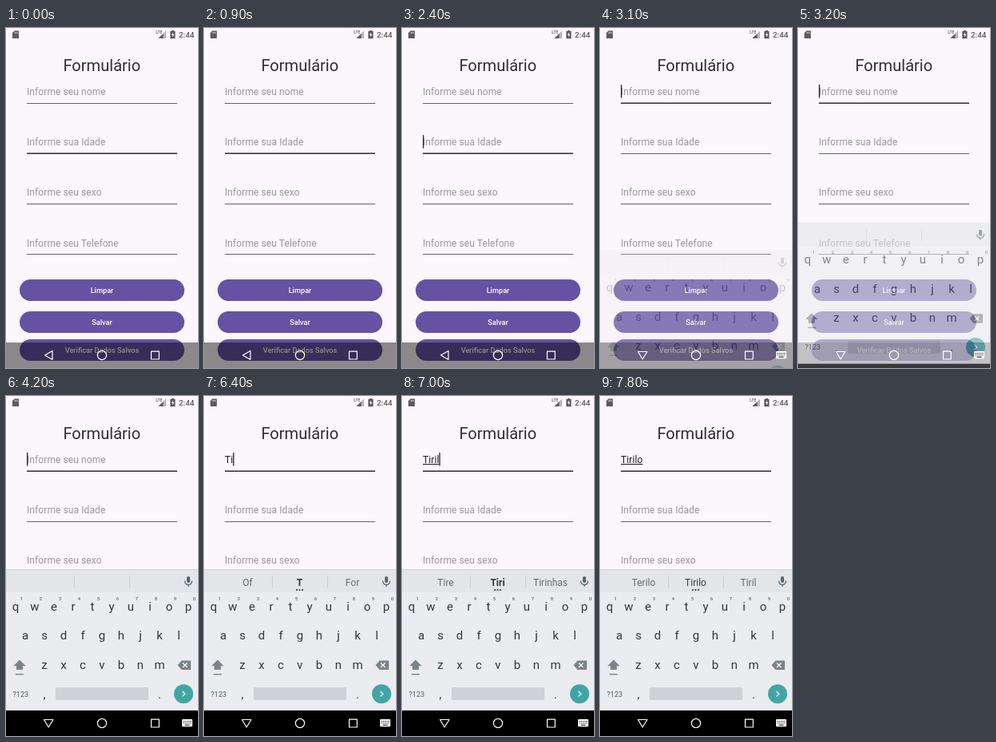
An HTML page that plays this animation: 240x426 px, repeating every 8 s.

```html
<!DOCTYPE html>
<html lang="pt">
<head>
<meta charset="utf-8">
<title>Formulário</title>
<style>
  html, body { margin: 0; width: 100%; height: 100%; overflow: hidden; background: #fcf6fd; }
  svg { display: block; width: 240px; height: 426px; font-family: Roboto, sans-serif; }
</style>
</head>
<body>
<svg id="stage" viewBox="0 0 240 426"></svg>
<script>
const LOOP = 8000;
const NS = 'http://www.w3.org/2000/svg';
const stage = document.getElementById('stage');

function add(parent, tag, attrs = {}, text) {
  const el = document.createElementNS(NS, tag);
  for (const k in attrs) el.setAttribute(k, attrs[k]);
  if (text !== undefined) el.textContent = text;
  parent.appendChild(el);
  return el;
}
const rect = (p, x, y, width, height, fill, rx = 0) => add(p, 'rect', { x, y, width, height, fill, rx });
const path = (p, d, attrs) => add(p, 'path', { d, ...attrs });
const label = (p, x, y, size, fill, text, attrs = {}) =>
  add(p, 'text', { x, y, 'font-size': size, fill, ...attrs }, text);
const mid = { 'text-anchor': 'middle' };
const medium = { 'text-anchor': 'middle', 'font-weight': 500 };
const spaced = { 'letter-spacing': .09 };
const show = (el, on) => el.setAttribute('visibility', on ? 'visible' : 'hidden');

// Status bar
rect(stage, 0, 0, 240, 426, '#fcf6fd');
const GREY = '#5d595f';
path(stage, 'M10.5 3.5H16V13H8V6Z', { fill: GREY });
path(stage, 'M11 5V7M12.7 5V7M14.4 5V7', { stroke: '#fcf6fd', 'stroke-width': .7 });
label(stage, 187.3, 6.8, 5, GREY, 'LTE', { 'font-weight': 500 });
path(stage, 'M200 3.5V13H190.5Z', { fill: '#b9b4bb' });
path(stage, 'M196.5 7V13H190.5Z', { fill: GREY });
path(stage, 'M207 3H210V4H211.5V13.3H205.3V4H207Z', { fill: GREY });
path(stage, 'M208.9 5.5L206.8 9H208.2V11.5L210.2 8H208.9Z', { fill: '#fcf6fd' });
label(stage, 225.7, 11.8, 9.8, GREY, '2:44', medium);

// Form
label(stage, 119.8, 54, 20.1, '#2f2c35', 'Formulário', mid);
const fields = ['nome', 'Idade', 'sexo', 'Telefone'].map((word, i) => {
  const hint = label(stage, 26, 84 + i * 63.2, 12, '#9a959d',
    `Informe ${word === 'Idade' ? 'sua' : 'seu'} ${word}`, spaced);
  const y = 94 + i * 63;
  return { hint, y, line: rect(stage, 26, y, 188, 1, '#67636b') };
});
function focusLine({ line, y }, on) {
  line.setAttribute('y', on ? y - .6 : y);
  line.setAttribute('height', on ? 1.6 : 1);
  line.setAttribute('fill', on ? '#3a3745' : '#67636b');
}
const typed = label(stage, 26, 84, 12, '#1d1b20', '', spaced);
const composing = rect(stage, 26, 85, 0, 1, '#1d1b20');
const caret = rect(stage, 26, 71, 1.3, 16.5, '#25222b');

[['Limpar', 315], ['Salvar', 355], ['Verificar Dados Salvos', 390]].forEach(([text, y]) => {
  rect(stage, 17, y, 206, 27, '#6552a2', 13.5);
  label(stage, 120, y + 17, 9.2, '#fff', text, medium);
});

// Translucent navigation bar; the keyboard slides in over it
add(stage, 'rect', { y: 394, width: 240, height: 32, opacity: .45 });

// Keyboard
const board = add(stage, 'g');
const INK = '#30383e', SOFT = '#7b8489', MIC = '#55656c';
rect(board, 0, 217, 240, 1, '#d5d5da');
rect(board, 0, 218, 240, 176, '#eaecf0');
rect(board, 0, 218, 240, 28, '#e3e5e9');
rect(board, 0, 394, 240, 60, '#000');
[85, 154].forEach(x => rect(board, x, 225, 1, 16, '#cdd0d4'));

rect(board, 226, 226, 4, 8, MIC, 2);
path(board, 'M223.6 231.5C223.6 238 232.4 238 232.4 231.5M228 236V239', { fill: 'none', stroke: MIC, 'stroke-width': 1.2 });

[['qwertyuiop', 12, 268.7], ['asdfghjkl', 24, 305.3], ['zxcvbnm', 48, 341.7]].forEach(([keys, x0, y], row) => {
  [...keys].forEach((key, i) => {
    const x = x0 + i * 24;
    label(board, x, y, 15, INK, key, mid);
    if (!row) label(board, x + 7.5, 256, 6, '#646d73', (i + 1) % 10, medium);
  });
});
path(board, 'M17 330.5L24.7 338.3H21V343H13V338.3H9.3Z', { fill: SOFT });
rect(board, 12, 348, 10, 1.4, SOFT);
path(board, 'M219.5 331.5H231V343H219.5L214.5 337.2Z', { fill: SOFT });
path(board, 'M221 334.5L226.5 340M226.5 334.5L221 340', { stroke: '#fff', 'stroke-width': 1.2 });
label(board, 18.3, 376.5, 9, '#535c62', '?123', mid);
label(board, 48, 379, 15, INK, ',', mid);
rect(board, 62, 365, 116, 16, '#cfd1d6', 2);
label(board, 192, 378.5, 15, INK, '.', mid);
add(board, 'circle', { cx: 222, cy: 373.2, r: 12, fill: '#42a5a5' });
path(board, 'M220.5 370L223.8 373.2L220.5 376.4', { fill: 'none', stroke: '#fff', 'stroke-width': 1.3 });

const slots = [54.5, 119.5, 185.5].map((x, i) => label(board, x, 237.7, 12, i === 1 ? INK : '#646d73', '', mid));
const dots = add(board, 'g');
[116, 119.5, 123].forEach(cx => add(dots, 'circle', { cx, cy: 243, r: 1.1, fill: INK }));

// Navigation icons
const outline = { fill: 'none', stroke: '#fff', 'stroke-width': 1.2, 'stroke-linejoin': 'round' };
const back = path(stage, 'M48.5 410L58 404.5V415.5Z', outline);
const down = path(stage, 'M47.5 405.5H59L53.2 415Z', outline);
add(stage, 'circle', { cx: 120, cy: 410, r: 5.6, ...outline });
path(stage, 'M181.5 405.2H191.3V415H181.5Z', outline);
const switcher = add(stage, 'g');
rect(switcher, 220, 405, 13, 9.3, '#fff', 1);
path(switcher, 'M221.5 407.5H231.5M221.5 409.7H231.5', { stroke: '#000', 'stroke-width': 1.1, 'stroke-dasharray': '1.2 1' });
path(switcher, 'M223.5 412.2H229.5', { stroke: '#000' });

// Timing, in ms
const NAME = 'Tirilo';
const KEYS = [6100, 6400, 6600, 6800, 7000, 7300];
const HINTS = [
  [6150, 'Of', 'T', 'For'],
  [6500, 'Tio', 'Ti', 'Time'],
  [6700, 'Tiro', 'Tir', 'Tirando'],
  [6900, 'Tire', 'Tiri', 'Tirinhas'],
  [7100, 'Tirei', 'Tiril', 'Tirinha'],
  [7400, 'Terilo', NAME, 'Tiril']
];
// time, offset, opacity
const RISE = [[3000, 110, 0], [3100, 62, .25], [3200, 27, .58], [3300, 4, .9], [3400, 0, 1]];
const FOCUS = 2900;

function riseAt(t) {
  if (t <= RISE[0][0]) return RISE[0];
  const i = RISE.findIndex(s => s[0] > t);
  if (i < 0) return RISE[RISE.length - 1];
  const a = RISE[i - 1], b = RISE[i], k = (t - a[0]) / (b[0] - a[0]);
  return a.map((v, j) => v + (b[j] - v) * k);
}

function caretOn(t) {
  if (t < FOCUS) return t >= 400 && Math.floor((t - 400) / 500) % 2 === 0;
  if (t < 3700) return true;
  if (t < KEYS[0]) return Math.floor((t - 3700) / 500) % 2 === 1;
  return t < 7800;
}

function draw(t) {
  const onName = t >= FOCUS;
  focusLine(fields[0], onName);
  focusLine(fields[1], !onName);

  const text = NAME.slice(0, KEYS.filter(k => t >= k).length);
  typed.textContent = text;
  const width = text ? typed.getComputedTextLength() : 0;
  show(fields[0].hint, !text);
  composing.setAttribute('width', t >= 6500 ? width : 0);
  caret.setAttribute('x', 26 + width);
  caret.setAttribute('y', onName ? 71 : 134.2);
  show(caret, caretOn(t));

  const [, shift, alpha] = riseAt(t);
  board.setAttribute('transform', `translate(0 ${shift})`);
  board.setAttribute('opacity', alpha);
  const open = t >= 3100;
  show(back, !open);
  show(down, open);
  show(switcher, open);

  const hints = HINTS.filter(h => t >= h[0]).pop();
  slots.forEach((slot, i) => slot.textContent = hints ? hints[i + 1] : '');
  slots[1].setAttribute('font-weight', t < 7400 ? 700 : 400);
  show(dots, hints);
}

const start = performance.now();
function tick() {
  draw((performance.now() - start) % LOOP);
  requestAnimationFrame(tick);
}
tick();
</script>
</body>
</html>
```
